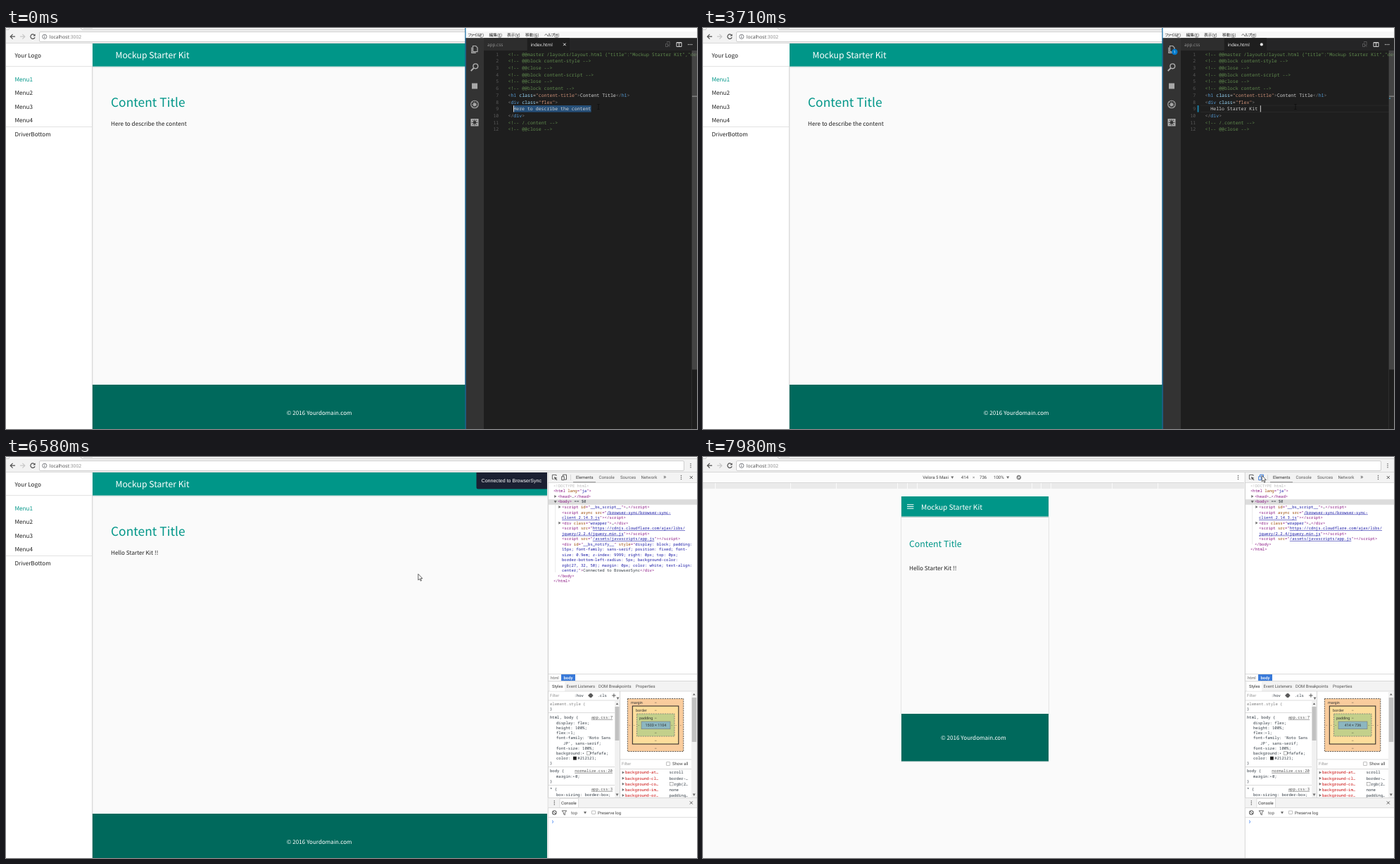
An HTML page that plays this animation: 982 px wide and 570 px high, repeating every 8000 ms.

```html
<!DOCTYPE html>
<html lang="en">
<head>
<meta charset="utf-8">
<title>Live reload demo</title>
<style>
html, body { margin: 0; width: 100%; height: 100%; overflow: hidden; background: #fff; }
svg { display: block; }
text { white-space: pre; text-rendering: geometricPrecision; }
</style>
</head>
<body>
<svg id="stage" width="982" height="570" viewBox="0 0 982 570"></svg>
<script>
const PAGE = "'Noto Sans CJK JP','Noto Sans CJK',sans-serif";
const UI = "Roboto,sans-serif", CHROME = "'Open Sans',sans-serif";
const MONO = "'Noto Sans Mono',monospace";
const TEAL = '#009688', DEEP = '#00695c', INK = '#212121', GREY = '#5a5a5a';
const CHAR = 3.93, CODE_X = 713.5, TYPE_X = 721.3;
const TYPED = 'Hello Starter Kit !!';

// Drawing helpers
const esc = s => s.replace(/&/g, '&amp;').replace(/</g, '&lt;');
const text = (x, y, size, fill, s, font = UI, more = '') =>
  `<text x="${x}" y="${y}" font-size="${size}" fill="${fill}" font-family="${font}" ${more}>${esc(s)}</text>`;
const rect = (x, y, w, h, fill, more = '') =>
  `<rect x="${x}" y="${y}" width="${w}" height="${h}" fill="${fill}" ${more}/>`;
const path = (d, stroke, width = 1, fill = 'none') =>
  `<path d="${d}" stroke="${stroke}" stroke-width="${width}" fill="${fill}"/>`;
const dot = (x, y, r, fill, more = '') => `<circle cx="${x}" cy="${y}" r="${r}" fill="${fill}" ${more}/>`;
const group = (id, ...parts) => `<g id="${id}">${parts.join('')}</g>`;
const cross = (x, y, r, c) => path(`M${x - r} ${y - r}l${2 * r} ${2 * r}m0 ${-2 * r}l${-2 * r} ${2 * r}`, c, 1);
const dots = (x, y, dx, dy, c = GREY) => [-1, 0, 1].map(i => dot(x + i * dx, y + i * dy, .75, c)).join('');
const arrow = (x, y, down, c = '#6e6e6e') =>
  path(down ? `M${x - 2} ${y - 1.5}h4l-2 3.4z` : `M${x - 1.4} ${y - 2}v4l3.2-2z`, 'none', 0, c);
const check = (x, y) => rect(x - 2.3, y - 2.3, 4.6, 4.6, '#fff', 'stroke="#999" stroke-width=".6"');

// "~k" in a string switches to colour k
const INKS = {
  c: '#608b4e', g: '#808080', b: '#569cd6', l: '#9cdcfe', s: '#ce9178', w: '#d4d4d4',
  p: '#881280', a: '#994500', v: '#1a1aa6', u: '#1a1aa6', k: '#303942', n: '#b8b8b8', r: '#c80000'
};
const rich = (x, y, size, s) => {
  const spans = s.split('~').slice(1).map(part =>
    `<tspan fill="${INKS[part[0]]}"${part[0] === 'u' ? ' text-decoration="underline"' : ''}>${esc(part.slice(1))}</tspan>`);
  return `<text x="${x}" y="${y}" font-size="${size}" font-family="${MONO}">${spans.join('')}</text>`;
};

// Web page
const menu = ['Menu1', 'Menu2', 'Menu3', 'Menu4'];
const sitePage = () => group('page',
  rect(0, 22, 770, 548, '#fafafa'),
  rect(0, 22, 122.5, 548, '#fff'), rect(122.2, 54, .9, 516, '#d0d0d0'), rect(123.1, 54, 1, 453, '#f0f0f0'),
  rect(0, 54, 122.5, .8, '#ddd'), rect(0, 140, 122.5, .8, '#ddd'),
  rect(123, 54.5, 647, 1, '#b5c9c7'), rect(123, 55.5, 647, 1, '#e6ecec'),
  rect(123, 22, 647, 32.6, TEAL), rect(123, 507, 647, 63, DEEP),
  group('pageText',
    text(12.4, 41.8, 8.17, INK, 'Your Logo', PAGE),
    ...menu.map((m, i) => text(12.4, 75.9 + i * 19.5, 8.17, i ? INK : TEAL, m, PAGE)),
    text(12.4, 154.3, 8.17, INK, 'DriverBottom', PAGE),
    text(155.5, 43.4, 12.2, '#fff', 'Mockup Starter Kit', PAGE),
    text(149, 112, 17.4, TEAL, 'Content Title', PAGE),
    text(149, 138.9, 8.17, INK, '', PAGE, 'id="message"'),
    text(398.8, 550.4, 8.1, '#fff', '© 2016 Yourdomain.com', PAGE, 'font-weight="500"')));

const mobilePage = () => group('mobile',
  rect(281, 56, 211, 377.5, '#e4e4e4'), rect(282, 56, 209, 376.5, '#fafafa'),
  rect(282, 84.5, 209, 1.4, '#b5c9c7'), rect(282, 56, 209, 28.5, TEAL), rect(282, 365, 209, 67.5, DEEP),
  path('M290 67.8h9.4M290 70.5h9.4M290 73.2h9.4', '#fff', 1),
  text(310, 74.6, 10.1, '#fff', 'Mockup Starter Kit', PAGE, 'font-weight="500"'),
  text(293, 128.4, 12.3, TEAL, 'Content Title', PAGE),
  text(293, 160.8, 8.17, INK, TYPED, PAGE),
  text(338, 402.3, 8.1, '#fff', '© 2016 Yourdomain.com', PAGE, 'font-weight="500"'));

const browserBar = () => [
  rect(0, 0, 982, 22, '#f2f2f2'), rect(0, 0, 982, 2, '#fafafa'), rect(0, 21.2, 982, .8, '#d2d2d2'),
  path('M0 2.3h4l1-2M106 0l2 2.3h874M110 0h13', '#bbb', .8),
  rect(47.5, 5.5, 916, 14, '#fff', 'rx="1.5" stroke="#c4c4c4" stroke-width=".8"'),
  path('M13 12.2H6.2m3.4-3.4-3.4 3.4 3.4 3.4', '#505050', 1.2),
  path('M20 12.2h6.8m-3.4-3.4 3.4 3.4-3.4 3.4', '#c8c8c8', 1.2),
  group('reload', path('M40.6 10.2a3.2 3.2 0 1 0 .5 3', '#505050', 1.2), path('M41.6 8.4v3.2h-3.2z', 'none', 0, '#505050')),
  group('loading', cross(38, 12.2, 2.8, '#505050')),
  dot(54.8, 12.3, 3.1, 'none', 'stroke="#5f6368" stroke-width=".8"'), path('M54.8 11.8v2.3M54.8 10.2v.9', '#5f6368', .9),
  text(61.8, 14.8, 6.7, '#444', 'localhost', CHROME), text(90, 14.8, 6.7, '#888', ':3002', CHROME),
  dots(973, 12.3, 0, 2.5)
].join('');

// Code editor
const note = s => '~c<' + `!-- ${s} -->`;
const codeLines = [
  note('@@master /layouts/layout.html {"title":"Mockup Starter Kit","description":""}'),
  note('@@block content-style'), note('@@close'), note('@@block content-script'),
  note('@@close'), note('@@block content'),
  '~g<~bh1 ~lclass~w=~s"content-title"~g>~wContent Title~g</~bh1~g>',
  '~g<~bdiv ~lclass~w=~s"flex"~g>', '', '~g</~bdiv~g>', note('/.content'), note('@@close')
];
const badge = (id, y) => group(id, dot(670.3, y, 4.2, '#007acc'),
  text(670.3, y + 2, 5.2, '#fff', '1', UI, 'text-anchor="middle"'));
// Wide kanji keep their advance, kana are set tightly
const menuItem = (x, label, key, tight) =>
  `<text x="${x}" y="11.8" font-size="5.8" fill="#222" font-family="${PAGE}"><tspan letter-spacing="${tight}">${label}</tspan>` +
  `<tspan font-size="5.6">(<tspan text-decoration="underline">${key}</tspan>)</tspan></text>`;

const editor = () => group('editor',
  rect(652.5, 0, 329.5, 570, '#1e1e1e'), rect(653, 0, 329, 14.3, '#fff'), rect(653, 5, 329, 9.3, '#f7f7f7'),
  menuItem(656, 'ファイル', 'F', -1.75), menuItem(686.5, '編集', 'E', 0), menuItem(712, '表示', 'V', 0),
  menuItem(738, '移動', 'G', 0), menuItem(765, 'ヘルプ', 'H', -1.3),
  rect(653, 14.3, 26, 556, '#333'), rect(679, 14.3, 303, 17.7, '#252526'),
  rect(679, 14.3, 61.5, 17.7, '#2d2d2d'), rect(741, 14.3, 60, 17.7, '#1e1e1e'),
  text(684, 25.8, 6.4, '#969696', 'app.css', CHROME), text(745.5, 25.8, 6.3, '#fff', 'index.html', CHROME),
  group('saved', cross(793.8, 23.4, 1.8, '#e8e8e8')), group('dirty', dot(793.8, 23.4, 2.1, '#e0e0e0')),
  group('diffIcon', path('M937.5 22.5h3v4h-3zM939.5 21v-1.5h3.6v5h-1.5M941 24.5l2.5 2.5', '#d0d0d0', .8)),
  path('M953 20.5h7v6h-7zM956.5 20.5v6', '#d0d0d0', 1), rect(953, 20, 7, 1.5, '#d0d0d0'), dots(972.2, 23.5, 2.5, 0, '#d0d0d0'),
  path('M663.5 25.5h4.2l2.3 2.4v5.8h-6.5zM661.8 27.5v7.9h6', '#b0b0b0', 1.2),
  dot(667.3, 54.3, 3.4, 'none', 'stroke="#b0b0b0" stroke-width="1.4"'), path('M664.7 57l-4 4', '#b0b0b0', 1.8),
  rect(662, 78.5, 8, 8, '#a8a8a8'),
  dot(666, 108.5, 5.3, 'none', 'stroke="#a8a8a8" stroke-width="1.1"'), dot(666, 108.8, 2.3, '#a8a8a8'),
  path('M662.5 105l7 7M662 109h8M666 104.5v8M663 112l6-6', '#a8a8a8', .7),
  rect(660.5, 129, 11, 10.5, '#b0b0b0'), path('M666 130v8.5M661.5 134.2h9', '#333', 1.1), rect(664, 132.3, 4, 3.8, '#333'),
  path('M662.8 131.2h1.5M667.8 131.2h1.5M662.8 137.2h1.5M667.8 137.2h1.5', '#333', 1.2),
  badge('fileBadge', 34), badge('gitBadge', 86.8),
  group('lineBox', path('M707 110.2h268M707 119.5h268', '#2b2b2b', .8)),
  group('gutter', rect(702.6, 110, 1.9, 9.6, '#1b81a8'), rect(975, 99, 2, 2, '#1b81a8')),
  group('selection', rect(721.3, 110, 110.3, 9.6, '#264f78')),
  ...codeLines.map((s, i) => {
    const y = 39.5 + i * 9.72;
    return text(700.3, y, 6.55, GREY, String(i + 1), MONO, 'text-anchor="end"') + (s && rich(CODE_X, y, 6.55, s));
  }),
  text(TYPE_X, 117.2, 6.55, INKS.w, '', MONO, 'id="typed"'),
  rect(0, 110.2, .9, 9.2, '#e6e6e6', 'id="caret"'),
  rect(974.3, 32, .6, 538, '#383838'), rect(975, 32, 7, 453.5, 'rgba(121,121,121,.42)'), rect(975, 96.6, 7, 1, '#a0a0a0'),
  rect(652.5, 0, 1, 570, '#1681c6'));

// Developer tools
const OPEN = '~p<' + 'script', CLOSE = '~p><' + '/script>';
const domHead = [
  [778, '~n<!DOCTYPE html>'],
  [778, '~p<html ~alang~p="~vja~p">'],
  [784, '~p<head>~k…~p</head>', 'closed'],
  [784, '~p<body>~k == $0', 'open'],
  [790, OPEN + ' ~aid~p="~v__bs_script__~p">~k…~p<' + '/script>', 'closed'],
  [790, OPEN + ' ~aasync src~p="~u/browser-sync/browser-sync-'],
  [790, '~uclient.2.14.3.js~p"' + CLOSE],
  [790, '~p<div ~aclass~p="~vwrapper~p">~k…~p</div>', 'closed'],
  [790, OPEN + ' ~asrc~p="~uhttps://cdnjs.cloudflare.com/ajax/libs/'],
  [790, '~ujquery/2.2.4/jquery.min.js~p"' + CLOSE],
  [790, OPEN + ' ~asrc~p="~u/assets/javascripts/app.js~p"' + CLOSE]
];
const domNotice = [
  '~p<div ~aid~p="~v__bs_notify__~p" ~astyle~p="~vdisplay: block; padding:',
  '~v15px; font-family: sans-serif; position: fixed; font-',
  '~vsize: 0.9em; z-index: 9999; right: 0px; top: 0px;',
  '~vborder-bottom-left-radius: 5px; background-color:',
  '~vrgb(27, 32, 50); margin: 0px; color: white; text-align:',
  '~vcenter;~p">~kConnected to BrowserSync~p</div>'
].map(s => [790, s]);
const domTail = [[784, '~p</body>'], [778, '~p</html>']];
const domRows = (rows, start) => rows.map(([x, s, fold], i) => {
  const y = 41 + (start + i) * 7.53;
  return rich(x, y + 1.9, 5.62, s) + (fold ? arrow(x - 3.3, y, fold === 'open') : '');
}).join('');

const css = (x, y, s) => rich(x, y + 1.9, 5.62, s);
const cssLink = (y, s) => text(862, y + 1.9, 5.62, '#555', s, MONO, 'text-anchor="end" text-decoration="underline"');
const declarations = ['display: flex;', 'height: 100%;', 'flex:▸1;', "font-family: 'Noto Sans", "   JP', sans-serif;",
  'font-size: 100%;', 'background:▸  #fafafa;', 'color:   #212121;'];
const computed = [['at', 'scroll'], ['cl', 'border-…'], ['co', '  rgb(2…'], ['im', 'none'], ['or', 'padding…']];
const label = (x, y, s, c = '#444', size = 6.1, more = '') => text(x, y + 2.1, size, c, s, UI, more);
const rule = (x, y, w) => rect(x, y, w, .7, '#ccc');
const dashed = 'stroke="#333" stroke-width=".8" stroke-dasharray="2 1.3"';
const small = (x, y, s) => label(x, y, s, '#333', 5.4);

const devtools = () => group('devtools',
  rect(769, 22, 213, 548, '#fff'), rect(769.8, 22, .9, 548, '#bdbdbd'),
  rect(770.7, 22, 212, 14, '#f3f3f3'), rule(770.7, 36, 212), rect(806, 35.3, 32, 1, '#888'),
  path('M782 27v-1.6h-5.6v6h2', GREY, .9), path('M779 28l4.6 1.9-2 .7 1.8 1.9-.8.7-1.8-1.9-.8 1.7z', 'none', 0, GREY),
  `<g id="deviceIcon" stroke="${GREY}" fill="none" stroke-width="1">
    <path d="M791.5 27v-1.8h5v6.8h-2.5"/><path d="M789.7 27.7h3.5v5h-3.5z"/></g>`,
  rect(802.2, 25, .7, 8, '#ccc'),
  label(810, 29, 'Elements', '#333', 5.95),
  ...[[842.5, 'Console'], [873, 'Sources'], [902.5, 'Network']].map(([x, s]) => label(x, 29, s, GREY)),
  label(934, 28.6, '»', '#444', 9), dots(959.5, 29, 0, 2.4), cross(973.8, 29, 2, GREY),
  rect(770.7, 60.2, 212, 7.6, '#dcdcdc'), rect(780.5, 68, .6, 56, '#ddd'), domRows(domHead, 0),
  group('domLong', rect(780.5, 124, .6, 40, '#ddd'), domRows(domNotice, 11), domRows(domTail, 17)),
  group('domShort', domRows(domTail, 11)),
  rule(770.7, 308, 212), rect(789, 309, 20, 9.2, '#3879d9'),
  label(774, 313.5, 'html', '#666', 5.9), label(792.5, 313.5, 'body', '#fff', 5.9, 'font-weight="500"'),
  rect(770.7, 318.5, 212, 14.3, '#f3f3f3'), rule(770.7, 318.3, 212), rule(770.7, 332.6, 212),
  rect(773, 319.5, 21, 13.2, '#fff'), label(776, 326, 'Styles', '#333', 5.8),
  ...[[796.5, 'Event Listeners'], [842, 'DOM Breakpoints'], [895, 'Properties']].map(([x, s]) => label(x, 326, s, '#555', 6)),
  label(773, 339, 'Filter', '#999', 5.9), css(807.5, 339, '~k:hov'), css(840.5, 339, '~k.cls'),
  path('M827 339l3-3h2l2.6 3-2.6 3h-2z', 'none', 0, GREY), path('M861.2 339h5.4M863.9 336.3v5.4', GREY, 1),
  arrow(869.5, 343, true), rule(770.7, 345.6, 101),
  css(773, 351, '~gelement.style {'), css(773, 358.5, '~k}'), rule(771, 363, 94),
  css(773, 370, '~khtml, body {'), cssLink(370, 'app.css:7'),
  ...declarations.map((s, i) => css(782, 378 + i * 7.17, '~k' + s)),
  rect(825.5, 418.7, 4.6, 4.6, '#fafafa', 'stroke="#888" stroke-width=".6"'), rect(806, 425.8, 4.8, 4.8, INK),
  css(773, 435.3, '~k}'), rule(771, 440, 94),
  css(773, 446, '~kbody {'), cssLink(446, 'normalize.css:20'), css(782, 453.7, '~kmargin:▸0;'), css(773, 461.3, '~k}'),
  rule(771, 466, 94), css(773, 472, '~k* {'), cssLink(472, 'app.css:3'), css(782, 480, '~kbox-sizing: border-box;'),
  rect(865, 346, 7, 138, '#f1f1f1'), rect(865.5, 355, 6, 48, '#c1c1c1'),
  path('M866.8 352l1.7-2.4 1.7 2.4z', 'none', 0, GREY), arrow(868.5, 480, true), rect(872.2, 333, .8, 151, '#ccc'),
  rect(883.3, 343.5, 79.5, 75, '#f9cc9d', dashed), rect(890.3, 354, 65.5, 54, '#fddd9b', 'stroke="#222"'),
  rect(896.5, 365, 53.5, 32, '#c3d08b', dashed.replace('#333', '#777')),
  rect(903, 376, 41, 10.7, '#8cb6c0', 'stroke="#777" stroke-width=".6"'),
  small(888, 349, 'margin'), small(895, 360, 'border'), small(900, 370.5, 'padding'),
  ...[349, 360, 370.5, 392, 403, 413.5].map(y => small(921.5, y, '–')),
  ...[885.5, 892, 898.5, 945.5, 951.5, 958].map(x => small(x, 381, '-')),
  label(923.5, 381, '', '#333', 5.4, 'id="boxSize" text-anchor="middle"'),
  rule(873, 429.6, 101), label(875, 436, 'Filter', '#999', 5.9), check(941, 436), label(947, 436, 'Show all', '#444', 6),
  rule(873, 443, 101),
  ...computed.map(([name, value], i) => {
    const y = 448.5 + i * 8.15;
    return arrow(877, y, false) + css(880, y, `~rbackground-${name}…`) + css(942.5, y, '~k' + value);
  }),
  rect(943.5, 462.4, 4.6, 4.6, '#fff', 'stroke="#888" stroke-width=".6"'),
  rect(974, 333, 8, 151, '#f1f1f1'), rect(974.7, 342, 6.4, 63, '#c1c1c1'),
  path('M976 338.5l1.8-2.4 1.8 2.4z', 'none', 0, GREY), arrow(977.8, 480, true),
  rect(770.7, 484.5, 212, 86, '#fff'), rect(770.7, 484.5, 212, 14, '#f3f3f3'), rule(770.7, 484.3, 212), rule(770.7, 498.4, 212),
  rect(787, 485.2, 26.5, 13.4, '#fff', 'stroke="#ccc" stroke-width=".6"'),
  dots(779.3, 491.5, 0, 2.4), label(789, 492, 'Console', '#333', 6), cross(973.8, 491.5, 2, GREY),
  dot(779.3, 505.5, 2.7, 'none', `stroke="${GREY}" stroke-width="1.1"`), path('M777.5 503.7l3.6 3.6', GREY, 1),
  path('M790.2 502.8h6.4l-2.3 3v3l-1.8-1v-2z', GREY, .9), label(803, 505.5, 'top', '#555'), arrow(823, 505.5, true),
  check(835, 505.3), label(841, 505.5, 'Preserve log', '#444', 6), rule(770.7, 511.8, 212),
  path('M776 516.6l2 1.9-2 1.9', '#367cf1', .9));

const marks = [17, 124, 189, 276, 290, 304, 467, 480, 494, 581, 646];
const deviceBar = () => group('deviceBar',
  rect(0, 22, 769.8, 548, '#fafafa'), rect(0, 22, 769.8, 14.3, '#fcfcfc'), rule(0, 36, 769.8),
  rect(0, 37, 769.8, 8, '#eaeaea'), ...marks.map(x => rect(x, 37, 1, 8, '#fafafa')),
  label(312.3, 29, 'Velora 5 Maxi'), arrow(354.3, 29, true), label(366.8, 29, '414'), label(383, 29, '×', '#777'),
  label(393, 29, '736'), label(413, 29, '100%'), arrow(433.2, 29, true),
  dot(448.8, 29, 2.8, 'none', `stroke="${GREY}" stroke-width=".9"`), path('M447 28l2-1 1.7 3-2 1z', GREY, .7),
  dots(760.5, 29, 0, 2.4));

const stage = document.getElementById('stage');
stage.innerHTML = `<defs>${sitePage()}<clipPath id="screen"><rect x="279.2" y="56" width="211.8" height="376.5"/></clipPath></defs>` +
  rect(0, 0, 982, 570, '#fefefe') + '<use id="full" href="#page"/>' +
  group('notice', path('M668.5 22H769.5V45.6H671a2.5 2.5 0 0 1-2.5-2.5z', 'none', 0, '#1b2032'),
    text(675.6, 36.3, 7.05, '#fff', 'Connected to BrowserSync', "'Liberation Sans',Arial,sans-serif")) +
  deviceBar() + '<g id="framed" clip-path="url(#screen)"><use href="#page" x="279.2" y="34.2"/></g>' +
  mobilePage() + browserBar() + devtools() + editor() +
  group('beam', path('M-1.6-3.5h3.2M0-3.5v7M-1.6 3.5h3.2', '#0c0c0c', .7)) +
  group('pointer', path('M0 0v8.6l2-1.8 1.4 3.1 1.3-.6-1.3-3h2.6z', '#222', .7, '#fff'));

const $ = Object.fromEntries([...stage.querySelectorAll('[id]')].map(e => [e.id, e]));
const show = (id, on) => { $[id].style.display = on ? '' : 'none'; };
const write = (id, s) => { if ($[id].textContent !== s) $[id].textContent = s; };
const within = (t, a, b) => t >= a && t < b;

const keyTimes = [350, 560, 910, 980, 1120, 1330, 1680, 1960, 2030, 2100, 2380, 2450, 2520,
  2730, 3080, 3430, 3570, 3710, 3920, 4130];
const mousePath = [[6090, 842, 112], [6440, 585.8, 166.3], [6580, 585.8, 166.3], [7420, 794.3, 26.3]];

function mouseAt(t) {
  if (t <= mousePath[0][0]) return mousePath[0].slice(1);
  const i = mousePath.findIndex(k => k[0] > t);
  if (i < 0) return mousePath.at(-1).slice(1);
  const [a, b] = [mousePath[i - 1], mousePath[i]];
  const p = (t - a[0]) / (b[0] - a[0]), e = p * p * (3 - 2 * p);
  return [a[1] + (b[1] - a[1]) * e, a[2] + (b[2] - a[2]) * e];
}

function draw(time) {
  const t = Math.floor(time / 70 + 1e-6) * 70;
  const count = keyTimes.filter(k => k <= t).length;
  const edited = t >= 350, saved = t >= 4760, coding = t < 6580, device = t >= 7560, mobile = t >= 7840;

  show('editor', coding);
  write('typed', edited ? TYPED.slice(0, count) : 'Here to describe the content');
  $.caret.setAttribute('x', TYPE_X + count * CHAR - .2);
  show('caret', !(within(t, 4550, 5040) || within(t, 5460, 5880) || t >= 6440));
  show('selection', !edited);
  show('lineBox', edited);
  show('gutter', t >= 630);
  show('dirty', edited && !saved);
  show('saved', !edited || saved);
  show('fileBadge', edited && !saved);
  show('gitBadge', t >= 5040);
  $.diffIcon.style.opacity = t >= 5040 ? 1 : .35;

  const loading = within(t, 4830, 5040);
  show('loading', loading);
  show('reload', !loading);
  show('pageText', !within(t, 4900, 4970));
  write('message', t >= 4970 ? TYPED : 'Here to describe the content');

  const notice = within(t, 4970, 6860);
  show('notice', notice);
  show('domLong', notice);
  show('domShort', !notice);
  show('devtools', !coding);
  show('full', !device);
  show('framed', device && !mobile);
  show('mobile', mobile);
  show('deviceBar', t >= 7770);
  $.deviceIcon.setAttribute('stroke', t >= 7770 ? '#3879d9' : GREY);
  write('boxSize', mobile ? '414 × 736' : '1503 × 1104');

  const [x, y] = mouseAt(t), overCode = coding && x > 707;
  show('beam', overCode && !within(t, 5460, 6160));
  show('pointer', t >= 6160 && !overCode);
  for (const id of ['beam', 'pointer']) $[id].setAttribute('transform', `translate(${x} ${y})`);
}

const start = performance.now();
function tick() {
  draw((performance.now() - start) % 8000);
  requestAnimationFrame(tick);
}
tick();
</script>
</body>
</html>
```
